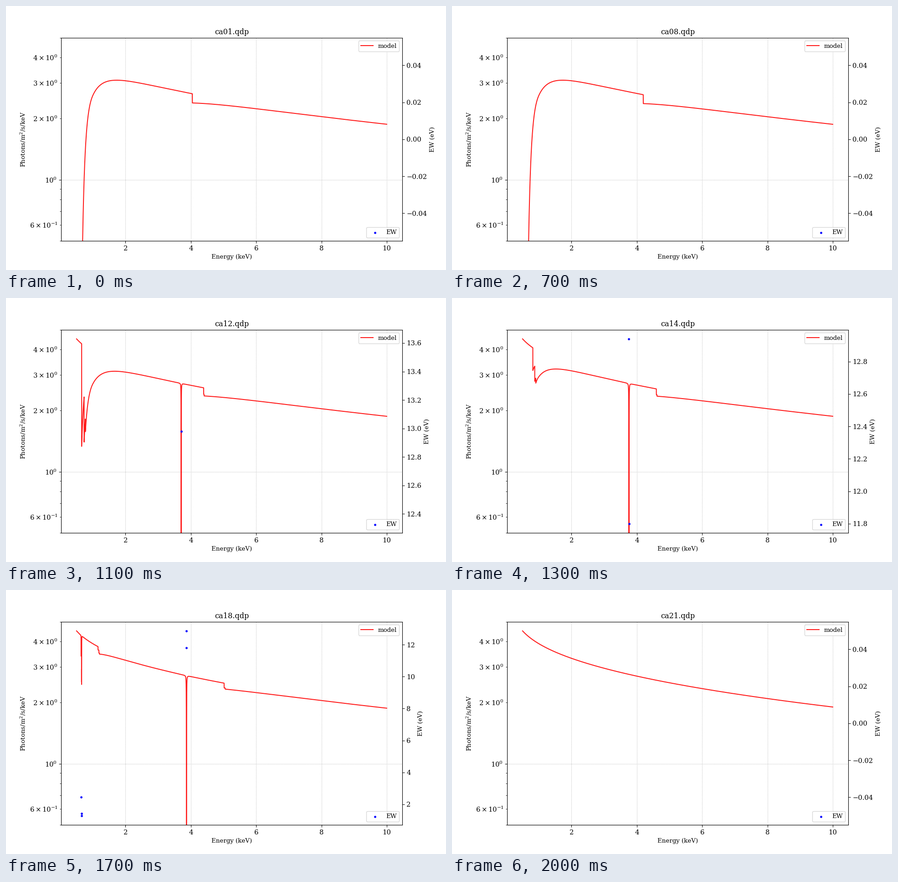
These frames come from a looping animation (966x580 px, 2.1 s). A matplotlib script:

```python
import numpy as np
import matplotlib.pyplot as plt
from matplotlib.animation import FuncAnimation
from matplotlib.ticker import LogFormatterSciNotation

W, H, DPI = 966, 580, 96.67
FRAMES = 21
plt.rcParams.update({"font.family": "serif", "font.serif": ["DejaVu Serif"],
                     "mathtext.fontset": "dejavuserif", "font.size": 10})

DECADE = 446.6  # depths below are in pixels on the log axis
E = np.linspace(0.5, 10, 19001)
LN_E, LOG_E = np.log(E), np.log10(E)
CONTINUUM = 0.5905 - 0.2205 * LOG_E - 0.0475 * LOG_E**2 - 0.0433 * LOG_E**3

# depth of a full L shell: a power law that steepens below 1 keV
L_FULL = np.exp(4.36 - 2.55 * LN_E + 0.12 * np.maximum(LN_E, 0) ** 2
                + 6 * np.maximum(-LN_E, 0) ** 2.2)


def k_edge(n):
    return np.interp(n, [1, 4, 8, 12, 16, 19, 20],
                     [4.046, 4.085, 4.196, 4.392, 4.801, 5.127, 5.47])


def l_edge(n):
    return np.interp(n, [8, 11, 12, 16, 18], [0.47, 0.592, 0.657, 0.974, 1.157])


def k_depth(n):
    if n > 20:
        return 0 * E
    amp = 10.8 if n == 20 else min(20.2 + 0.15 * (n - 1), 21.6)
    split = 0.0028 * (n - 7) if 12 <= n <= 18 else 0
    share = 0.8 * (E >= k_edge(n)) + 0.2 * (E >= k_edge(n) + split)
    return amp * (E / 4.05) ** -2.4 * share


def l_depth(n):
    electrons = min(19 - n, 8)
    if electrons <= 0:
        return 0 * E
    spread = 0.03 + 0.012 * electrons if electrons < 8 else 0
    share = sum(part * (E >= l_edge(n) + spread * shift)
                for shift, part in [(0, 0.45), (0.65, 0.4), (1, 0.15)])
    return (0.2 + 0.1 * electrons) * L_FULL * share


def lines(n):
    """Energy (keV) and equivalent width (eV) of each absorption line."""
    if n in (19, 20):
        scale = 1 if n == 19 else 0.73
        widths = (15.685, 9.4, 8.243, 7.264)
        return [(k_edge(n) - 0.0136 * n**2 / k**2, scale * ew)
                for k, ew in enumerate(widths, 2)]
    if not 12 <= n <= 18:
        return []
    alpha = 3.704 + 0.027 * (n - 12)
    found = [(alpha, 12.98 - 0.02 * (n - 12))]
    if n > 12:
        found.append((alpha + 0.002, 11.8))
    if n > 14:
        soft = 0.58 + 0.03 * (n - 16)
        found += [(soft, 2.45), (soft + 0.013, 1.43), (soft + 0.0155, 1.29)]
    return found


def line_depth(n):
    depth = 0 * E
    for e0, ew in lines(n):
        strong = ew > 3
        peak = 2000 if strong else 150 - 43 * ew
        gamma = 0.001 * max((ew / 14) ** 2, 0.3) if strong else 0.001
        depth += peak * gamma**2 / ((E - e0) ** 2 + gamma**2)
    return depth


def flux(n):
    return 10 ** (CONTINUUM - (k_depth(n) + l_depth(n) + line_depth(n)) / DECADE)


def ew_limits(values):
    if len(values) == 0:
        return -0.055, 0.055
    lo, hi = min(values), max(values)
    pad = 0.05 * (hi - lo) or 0.055 * hi
    return lo - pad, hi + pad


# the small surplus keeps rounding from losing a pixel
fig, ax = plt.subplots(figsize=((W + 0.01) / DPI, (H + 0.01) / DPI), dpi=DPI)
fig.subplots_adjust(left=120.83 / W, right=870 / W, bottom=0.11, top=0.88)
ax.set_yscale("log")
curve, = ax.plot(E, flux(1), color="red", lw=1.5, alpha=0.9, label="model")
ax.set_xlim(0.025, 10.475)
ax.set_ylim(0.5, 5)
ax.yaxis.set_minor_formatter(LogFormatterSciNotation(minor_thresholds=(2, 0.4)))
ax.grid(True, linestyle=":")
ax.set_xlabel("Energy (keV)")
ax.set_ylabel("Photons/m$^2$/s/keV")
ax.tick_params(which="both", labelsize=11)
title = ax.set_title("")
ax.legend(loc="upper right")

ax2 = ax.twinx()
dots = ax2.scatter([], [], s=28, marker=".", color="blue", alpha=0.9, label="EW")
ax2.set_xlim(0.025, 10.475)
ax2.set_ylabel("EW (eV)")
ax2.tick_params(labelsize=11)
ax2.legend(loc="lower right")


def draw(i):
    n = i + 1
    points = np.array(lines(n)).reshape(-1, 2)
    curve.set_ydata(flux(n))
    dots.set_offsets(points)
    ax2.set_ylim(*ew_limits(points[:, 1]))
    title.set_text(f"ca{n:02d}.qdp")
    return curve, dots, title


anim = FuncAnimation(fig, draw, frames=FRAMES, interval=100, repeat=True, repeat_delay=0)
plt.show()
```
